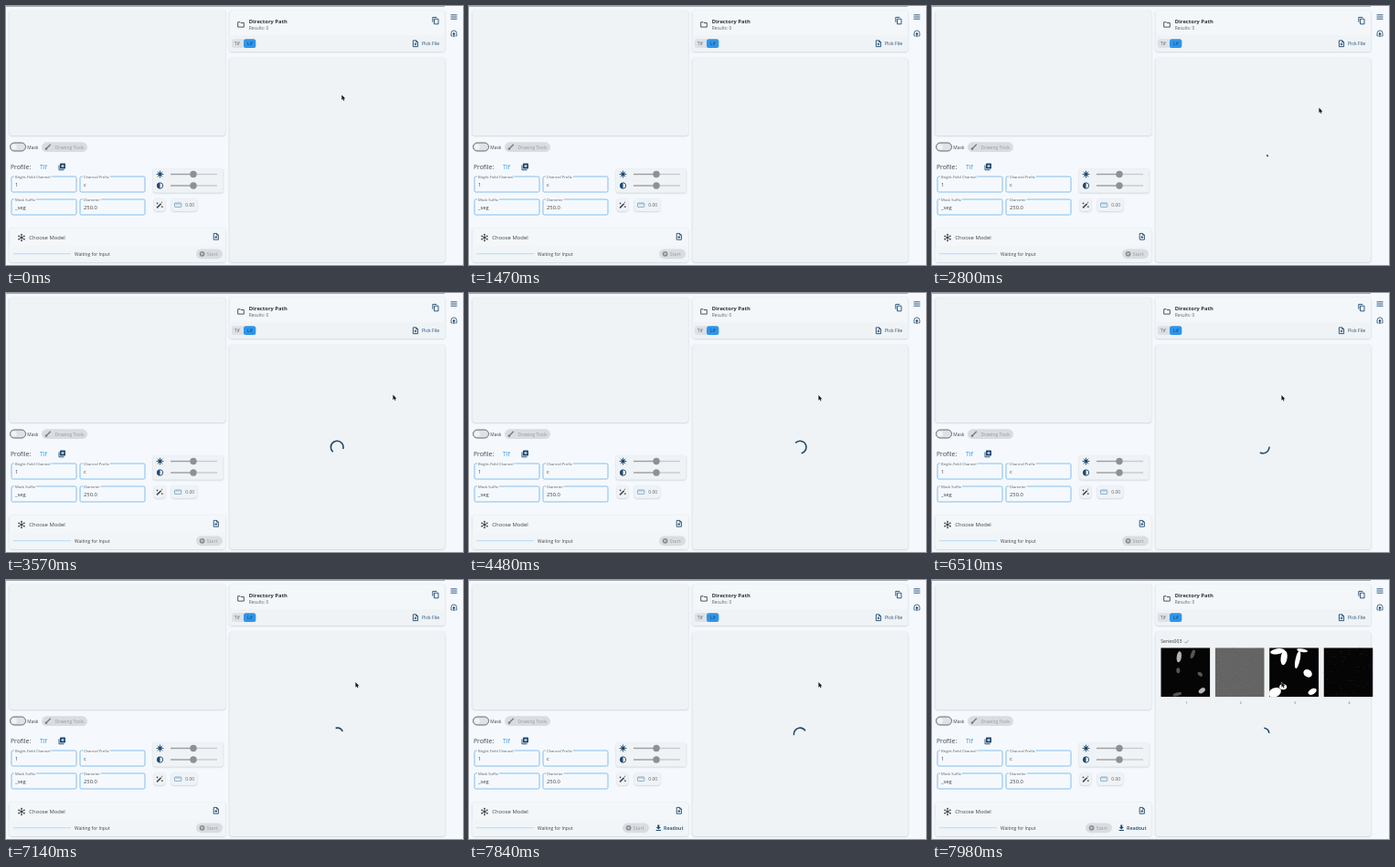
Write an HTML page with a canvas that moves like this. It is 500 px wide and 284 px high and loops after 8 s.

```html
<!DOCTYPE html>
<html lang="en">
<head>
<meta charset="utf-8">
<title>Segmentation tool</title>
<style>
html, body { margin: 0; width: 100%; height: 100%; overflow: hidden; background: #f5f9fd; }
canvas { display: block; width: 500px; height: 284px; }
</style>
</head>
<body>
<canvas id="stage"></canvas>
<script>
const W = 500, H = 284, LOOP = 8000;
const LOAD_AT = 2520, READOUT_AT = 7210, RESULTS_AT = 7980;
const BG = '#f5f9fd', PANEL = '#eff3f6', NAVY = '#204a70', INK = '#3e4449';
const BLUE = '#2f95ea', OUTLINE = '#69aee5', OFF = '#d9dde1', OFF_INK = '#969a9e';
const TAU = Math.PI * 2, RAD = Math.PI / 180;

const canvas = document.getElementById('stage');
const c = canvas.getContext('2d');
const dpr = window.devicePixelRatio || 1;
canvas.width = W * dpr;
canvas.height = H * dpr;

function text(s, x, y, size, color = INK, weight = 400) {
  c.font = `${weight} ${size}px "Open Sans", "Noto Sans", sans-serif`;
  c.fillStyle = color;
  c.fillText(s, x, y);
}

function box(x, y, w, h, r, fill, stroke, lw = 0.7) {
  c.beginPath();
  c.roundRect(x, y, w, h, r);
  if (fill) { c.fillStyle = fill; c.fill(); }
  if (stroke) { c.strokeStyle = stroke; c.lineWidth = lw; c.stroke(); }
}

function card(x, y, w, h, r, fill) {
  c.save();
  c.shadowColor = 'rgba(60,75,90,.3)';
  c.shadowBlur = 1.8 * dpr;
  c.shadowOffsetY = 0.6 * dpr;
  box(x, y, w, h, r, fill);
  c.restore();
}

function dot(x, y, r, fill) {
  c.beginPath();
  c.arc(x, y, r, 0, TAU);
  c.fillStyle = fill;
  c.fill();
}

function path(d, x, y, { stroke, fill, lw = 0.8 }) {
  const p = new Path2D(d);
  c.save();
  c.translate(x, y);
  c.lineJoin = 'round';
  if (fill) { c.fillStyle = fill; c.fill(p); }
  if (stroke) { c.strokeStyle = stroke; c.lineWidth = lw; c.stroke(p); }
  c.restore();
}

// Icons are drawn around their own centre
const line = (d, x, y, stroke = NAVY, lw = 0.8) => path(d, x, y, { stroke, lw });

function fileIcon(x, y) {
  line('M.8-3.4H-2.6V3.4H2.6V-1.6L.8-3.4V-1.6H2.6M0 2.1V-.7M-1.4.7H1.4', x, y, NAVY, 0.9);
}

function rays(x, y, n, r0, r1, color, lw) {
  for (let i = 0; i < n; i++) {
    const a = i / n * TAU - Math.PI / 2, u = Math.cos(a), v = Math.sin(a);
    line(`M${u * r0} ${v * r0}L${u * r1} ${v * r1}`, x, y, color, lw);
  }
}

function field(x, y, label, value) {
  box(x, y, 71, 17, 1.5, null, OUTLINE, 0.8);
  c.font = '400 4.1px "Open Sans", "Noto Sans", sans-serif';
  c.fillStyle = BG;
  c.fillRect(x + 3, y - 1, c.measureText(label).width + 2, 2);
  text(label, x + 4, y + 1.6, 4.1, '#596066');
  text(value, x + 4, y + 10.8, 5.8);
}

function slider(y) {
  c.fillStyle = '#c6cacd';
  c.fillRect(205, y - 0.7, 26, 1.4);
  c.fillStyle = '#9b9fa3';
  c.fillRect(180, y - 0.7, 25, 1.4);
  dot(205, y, 3.7, '#8d9195');
}

function viewer() {
  card(3.5, 5, 236.5, 137, 3, PANEL);
  box(4.5, 150, 17, 9, 4.5, '#dfe3e7', '#656b71', 1);
  dot(9, 154.5, 2.9, '#f0f3f5');
  text('Mask', 23.3, 156.5, 4.9);
  box(39, 149.3, 50, 10.8, 5.4, OFF);
  line('M-1.4 1.2L2.6-2.8', 46.2, 154.6, '#777c80', 1.3);
  dot(44, 156.6, 1.3, '#777c80');
  text('Drawing Tools', 53.5, 156.5, 4.85, OFF_INK);
}

function settings() {
  text('Profile:', 5, 178.7, 6.8);
  text('Tif', 37, 178.7, 6.9, '#2b93e6');
  box(59, 172.5, 6, 6, 0.8, NAVY);
  line('M-3.2-2V3.4H2.3', 61.2, 176.4, NAVY, 0.9);
  line('M-1.7 0H1.7M0-1.7V1.7', 62, 175.5, '#fff', 0.8);

  field(6, 187, 'Bright-Field Channel', '1');
  field(81, 187, 'Channel Prefix', 'c');
  field(6, 212, 'Mask Suffix', '_seg');
  field(81, 212, 'Diameter', '250.0');

  card(161, 178.3, 76.5, 26.4, 2.5, PANEL);
  dot(168.5, 184.5, 2.2, NAVY);
  rays(168.5, 184.5, 8, 2.5, 3.9, NAVY, 0.9);
  c.beginPath();
  c.arc(168.5, 197, 3.2, 0, TAU);
  c.strokeStyle = NAVY;
  c.lineWidth = 0.9;
  c.stroke();
  path('M0-3.2A3.2 3.2 0 0 0 0 3.2Z', 168.5, 197, { fill: NAVY });
  slider(184.5);
  slider(197);

  card(162, 211.5, 12, 13.5, 3, PANEL);
  line('M-3 3.2L1.7-1.5', 168, 218.2, INK, 1.5);
  line('M-2.5-2.8V-.8M-3.5-1.8H-1.5M2.8 1V3M1.8 2H3.8M2.6-3.5V-2', 168, 218.2, INK, 0.7);
  card(181, 211.5, 28, 13.5, 3, PANEL);
  box(184.4, 216, 7.4, 4.4, 0.6, null, '#6b9cc5', 0.8);
  line('M-2 0V-2M0 0V-2M2 0V-2', 188.1, 218.2, '#6b9cc5', 0.6);
  text('0.00', 196.3, 220.2, 5, '#62676c');
}

function startButton(x) {
  box(x, 266.4, 29, 10.8, 5.4, OFF);
  dot(x + 6.6, 271.8, 2.9, '#898e92');
  path('M-.9-1.5L1.6 0L-.9 1.5Z', x + 6.6, 271.8, { fill: OFF });
  text('Start', x + 11.4, 273.8, 5.5, OFF_INK);
}

function model(ready) {
  card(3.5, 244, 236.5, 37, 3, '#f3f7fa');
  box(3.5, 263, 236.5, 18, [0, 0, 3, 3], '#f1f5f8');
  rays(17, 254, 6, 0, 3.2, INK, 0.7);
  for (let i = 0; i < 6; i++) {
    const a = i / 6 * TAU - Math.PI / 2;
    dot(17 + 3.3 * Math.cos(a), 254 + 3.3 * Math.sin(a), 0.9, INK);
  }
  dot(17, 254, 1.3, INK);
  text('Choose Model', 25.3, 256.3, 5.9);
  fileIcon(229.8, 252.8);
  c.fillStyle = '#b3d6f2';
  c.fillRect(8, 271.3, 63, 0.9);
  text('Waiting for Input', 75, 273.5, 4.95);
  startButton(ready ? 168 : 208);
  if (ready) {
    path('M-1-3H1V-.6H2.6L0 2L-2.6-.6H-1ZM-2.7 2.5H2.7V3.4H-2.7Z', 207.3, 271.5, { fill: NAVY });
    text('Readout', 213, 273.6, 5.3, NAVY, 600);
  }
}

function directory() {
  card(244.3, 5, 236, 45, 3, '#f3f7fa');
  box(244.3, 32, 236, 18, [0, 0, 3, 3], PANEL);
  line('M-3.3-2.6H-.8L0-1.8H3.3V2.8H-3.3Z', 257, 20.3, INK, 0.9);
  text('Directory Path', 265.8, 18.9, 5.8, '#2c3135', 700);
  text('Results: 0', 265.8, 26.4, 4.8, '#5c6368');
  line('M-1.5-1.8H3V3.8H-1.5ZM-3.2 1.7V-3.6H1.3', 470, 16, NAVY, 0.9);
  box(247, 36.2, 26.3, 9.8, 2.5, '#dde1e5');
  box(260, 36.2, 13.3, 9.8, 2.5, BLUE);
  text('Tif', 249.8, 43, 5.3, '#60666b');
  text('Lif', 263.8, 43, 5.3, '#16466f');
  fileIcon(448, 41.2);
  text('Pick File', 455, 43.2, 5.2, NAVY, 500);
}

function sidebar() {
  line('M-3.5-2.2H3.5M-3.5 0H3.5M-3.5 2.2H3.5', 490, 12, NAVY, 0.9);
  line('M-1.5 2.3H-3V-.7A3 3 0 0 1 3-.7V2.3H1.5', 490, 30.6, NAVY, 0.8);
  line('M0 3.4V-1.5M-1.2 0H1.2', 490, 30.6, NAVY, 1.2);
}

// Each blob: x, y, rx, ry, tilt in degrees
function blobs(list, color) {
  c.fillStyle = color;
  for (const [x, y, rx, ry, tilt] of list) {
    c.beginPath();
    c.ellipse(x, y, rx, ry, tilt * RAD, 0, TAU);
    c.fill();
  }
}

function speckle(n, color, seed) {
  c.fillStyle = color;
  for (let i = 0; i < n; i++) {
    seed = (seed * 16807) % 2147483647;
    const x = seed % 53;
    seed = (seed * 16807) % 2147483647;
    c.fillRect(x, seed % 53, 1, 0.8);
  }
}

const samples = [
  () => {
    blobs([[20, 10, 2.6, 6, 8], [45, 47, 4, 2.5, -35]], '#b5b5b5');
    blobs([[19, 25, 2, 3, 0], [18, 51, 5, 1.8, -15], [35, 7, 2, 5, 20], [43, 29, 3, 2, 40]], '#555');
  },
  () => speckle(170, '#717171', 41),
  () => {
    blobs([[9, 4, 8, 3, -8], [16, 11, 3.5, 8, 8], [31, 13, 2.5, 10, 12], [42, 28, 5, 4, 35],
      [6, 49, 7, 5, -25], [15, 43, 4, 3, 0], [47, 48, 5, 3, -30], [36, 3, 6, 1.8, 10]], '#fff');
  },
  () => speckle(70, '#242424', 97)
];

function results() {
  text('Series003', 250.3, 69.4, 5.1, '#343a3f', 500);
  line('M-2 0L-.6 1.4L2.2-1.6', 278.3, 67.8, '#5a8a68', 0.7);
  samples.forEach((draw, i) => {
    const x = 250.3 + i * 59.4;
    c.save();
    c.translate(x, 74.3);
    c.beginPath();
    c.rect(0, 0, 54, 54);
    c.clip();
    c.fillStyle = i === 1 ? '#646464' : '#050505';
    c.fillRect(0, 0, 54, 54);
    draw();
    c.restore();
    text(String(i + 1), x + 27, 136.3, 3.6, '#62676b');
  });
}

// Cubic ease (0.4, 0, 0.2, 1), solved by bisection
function ease(x) {
  if (x <= 0 || x >= 1) return Math.min(1, Math.max(0, x));
  let lo = 0, hi = 1, s = 0.5;
  for (let i = 0; i < 20; i++) {
    s = (lo + hi) / 2;
    const bx = 1.2 * s * (1 - s) ** 2 + 0.6 * (1 - s) * s * s + s ** 3;
    if (bx < x) lo = s; else hi = s;
  }
  return s * s * (3 - 2 * s);
}

function tick(t) {
  const d = t - LOAD_AT;
  return Math.floor(d / 210) * 2 + (d % 210 >= 70 ? 1 : 0);
}

function spinner(t) {
  const ms = (tick(t) - 51) * 100;
  const phase = (((0.66 + ms / 1333) % 1) + 1) % 1;
  const head = ease(phase * 2), tail = ease(phase * 2 - 1);
  const start = (-90 + tail * 270 + phase * 90 + 88 + ms / 2222 * 360) * RAD;
  const sweep = Math.max((head - tail) * 270, 18) * RAD;
  c.beginPath();
  c.arc(362.2, 169, 6.8, start, start + sweep);
  c.strokeStyle = NAVY;
  c.lineWidth = 1.6;
  c.stroke();
}

function pointer(t) {
  if (t >= 1050 && t < LOAD_AT) return;
  let x = 367.3, y = 97.5;
  if (t >= LOAD_AT) {
    const k = ease((t - 3640) / 660);
    x = 423.4 - 41 * k;
    y = 111.6 + 0.5 * k;
  }
  path('M0 0V5.6L1.3 4.4L2.2 6.4L3.1 6L2.2 4.1H4Z', x, y, { stroke: '#fff', lw: 0.7 });
  path('M0 0V5.6L1.3 4.4L2.2 6.4L3.1 6L2.2 4.1H4Z', x, y, { fill: '#15181a' });
}

function draw(t) {
  c.setTransform(dpr, 0, 0, dpr, 0, 0);
  c.fillStyle = BG;
  c.fillRect(0, 0, W, H);
  c.fillStyle = '#858a8e';
  c.fillRect(0, 0, 480, 0.7);
  viewer();
  settings();
  model(t >= READOUT_AT);
  directory();
  card(244.3, 57, 236, 224, 3, PANEL);
  sidebar();
  if (t >= RESULTS_AT) results();
  if (t >= LOAD_AT) spinner(t);
  pointer(t);
}

const begin = performance.now();
function loop() {
  draw((performance.now() - begin) % LOOP);
  requestAnimationFrame(loop);
}
loop();
</script>
</body>
</html>
```
